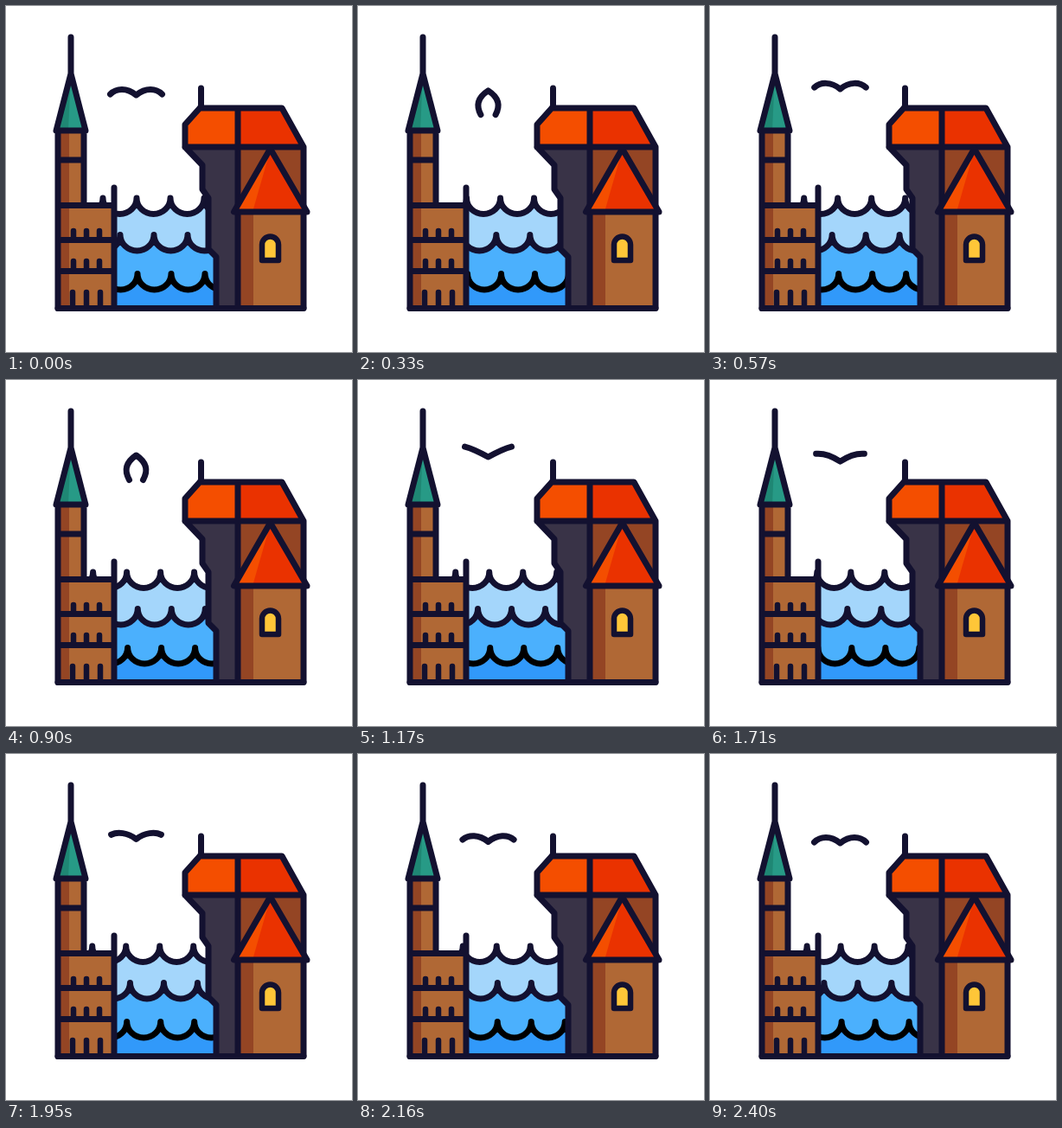
These frames come from a looping animation (400x400 px, 2430 ms). An HTML page:

```html
<!DOCTYPE html>
<html lang="en">
<head>
<meta charset="utf-8">
<title>Harbour town</title>
<style>
  html, body { margin: 0; width: 100%; height: 100%; overflow: hidden; background: #fff; }
  svg { display: block; width: 100vw; height: 100vh; }
  .line { fill: none; stroke: #131130; stroke-width: 7; stroke-linecap: round; stroke-linejoin: round; }
  .black { stroke: #000; }
  .thin { stroke-width: 6.5; }
  .dark { fill: #944524; }
  .brick { fill: #b06835; }
  .red { fill: #ea3200; }
  .orange { fill: #f44e00; }
</style>
</head>
<body>
<svg viewBox="0 0 400 400">
  <defs>
    <clipPath id="canal"><path d="M88 200H227V212L234 222V281L243 290V349H88Z"/></clipPath>
  </defs>

  <g clip-path="url(#canal)" id="water"></g>

  <g id="church">
    <path fill="#1f8774" d="M75 78L58 144H75Z"/>
    <path fill="#279a86" d="M75 78L92 144H72Z"/>
    <path class="brick" d="M60 144H90V230H125V349H60Z"/>
    <path class="dark" d="M60 144H73V349H60Z"/>
    <path class="line" d="M75 36V78L58 144H92L75 78M60 144V349.500M90 144V230M60 178H90M60 230.500H125M60 270.500H125M60 306.500H125M125 210V349"/>
    <path class="line thin" d="M78 260V267M93 260V267M108 260V267M78 295V303M93 295V303M108 295V303M77 331V347M93 331V347M109 331V347"/>
  </g>

  <g id="crane">
    <path fill="#393347" d="M207 163L227 184V212L234 222V281L243 290V349H268V163Z"/>
    <path class="dark" d="M268 163H344V240H268Z"/>
    <path class="orange" d="M224 118L207 137V163H268V118Z"/>
    <path class="red" d="M268 118H319L344 163H268Z"/>
    <path class="brick" d="M268 238H344V349H268Z"/>
    <path class="dark" d="M268 238H286V349H268Z"/>
    <path class="line" d="M225.500 95V118M224 118H319L344 163V349M224 118L207 137V163H344M207 163L227 184V212L234 222V281L243 290V349M268 118V349"/>
    <path class="red" d="M306 165L264 238H348Z"/>
    <path class="orange" d="M306 165L264 238H285Z"/>
    <path class="line" d="M305.500 165L263.500 238H348Z"/>
    <path class="line thin" style="fill:#ffc638" d="M296 294V276A9.500 9.500 0 0 1 315 276V294Z"/>
  </g>

  <path class="line" d="M60 349.500H344"/>
  <path class="line" id="bird"/>
</svg>
<script>
  const LOOP = 2430, STEP = 30, PITCH = 39;
  const NS = 'http://www.w3.org/2000/svg';
  const water = document.getElementById('water');
  const bird = document.getElementById('bird');

  // x: crest at rest, y: crest height, reach: swing, peak: time of the turn
  const waves = [
    { x: 112, y: 222, fill: '#a4d6fb', reach: 79, peak: 1215, line: 'line' },
    { x: 132, y: 264.5, fill: '#4bb0fd', reach: -73, peak: 1290, line: 'line' },
    { x: 152, y: 309.5, fill: '#3199fa', reach: 79, peak: 1215, line: 'line black' }
  ];

  // half wing: tip, two handles, body
  const wing = {
    rest: [-30, -1, -23, -8, -11, -9, 0, 0],
    down: [-8, 26, -13, 17, -14, 7, 0, -2.5],
    up: [-27, -10, -19, -8, -9, -3, 0, 2]
  };
  const flaps = [[0, 0], [300, -1], [600, 0.1], [900, -1], [1215, 1.1], [LOOP, 0]];

  const ease = u => (1 - Math.cos(Math.PI * u)) / 2;
  const swing = (t, peak) => ease(t < peak ? t / peak : (LOOP - t) / (LOOP - peak));

  function keyed(keys, t) {
    const i = keys.findIndex(k => k[0] > t);
    const [t0, a] = keys[i - 1], [t1, b] = keys[i];
    return a + (b - a) * ease((t - t0) / (t1 - t0));
  }

  function addPath(cls, d, parent) {
    const p = document.createElementNS(NS, 'path');
    p.setAttribute('class', cls);
    p.setAttribute('d', d);
    return parent.appendChild(p);
  }

  for (const w of waves) {
    w.group = water.appendChild(document.createElementNS(NS, 'g'));
    const d = `M${w.x - 5 * PITCH} ${w.y}` + `a19.5 18.5 0 0 0 ${PITCH} 0`.repeat(12);
    addPath('', d + 'V352H-90Z', w.group).setAttribute('fill', w.fill);
    addPath(w.line, d, w.group);
  }

  function birdPath(t) {
    const f = keyed(flaps, t);
    const y = 103 - 16 * swing(t, LOOP / 2);
    const end = f < 0 ? wing.down : wing.up;
    const p = wing.rest.map((v, i) => v + (end[i] - v) * Math.abs(f));
    const at = (i, side) => `${150.5 + side * p[i]} ${y + p[i + 1]}`;
    return `M${at(0, 1)}C${at(2, 1)} ${at(4, 1)} ${at(6, 1)}` +
      `C${at(4, -1)} ${at(2, -1)} ${at(0, -1)}`;
  }

  function draw(now) {
    const t = Math.floor((now % LOOP) / STEP) * STEP;
    for (const w of waves) {
      const dx = w.reach * swing(t, w.peak) % PITCH;
      w.group.setAttribute('transform', `translate(${dx} 0)`);
    }
    bird.setAttribute('d', birdPath(t));
  }

  const start = performance.now();
  function tick() {
    draw(performance.now() - start);
    requestAnimationFrame(tick);
  }
  tick();
</script>
</body>
</html>
```
